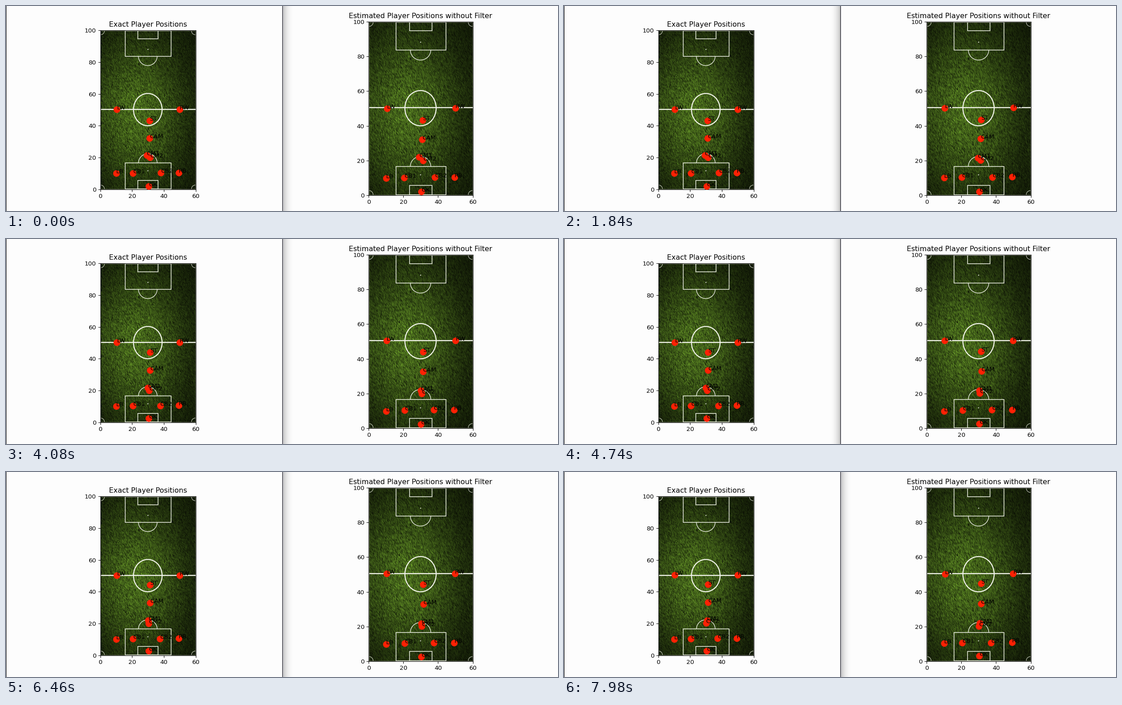
Recreate the animation shown at these times as a matplotlib script. Size 1227x456 px, loop 8 s.

```python
import numpy as np
import matplotlib.pyplot as plt
from matplotlib.animation import FuncAnimation
from matplotlib.patches import Arc, Ellipse, Rectangle

W, H, DPI = 1227, 456, 96
STEP_MS, LOOP_MS = 100, 8000
UPDATES, PERIOD_MS = 4, 1950
CHALK = "#e4e8da"

plt.rcParams["font.family"] = "DejaVu Sans"

# Starting line-up in pitch coordinates
FORMATION = {
    "LW": (10.4, 50.3), "RW": (49.9, 50.3), "ST": (31.1, 43.3),
    "CAM": (31.1, 32.1), "CM1": (29.2, 21.5), "CM2": (31.4, 20),
    "LB": (10.1, 10), "CB1": (20.6, 10.2), "CB2": (38.1, 10.4),
    "RB": (49.3, 10.5), "GK": (30.4, 2),
}
# Total drift over the loop: attackers go up, the midfielders swap sides
DRIFT = {"ST": (0.3, 1.4), "CAM": (0.3, 1.3), "CM1": (1.4, 0.5),
         "CM2": (-1.4, 0.2), "CB2": (-0.9, 0.2), "GK": (0, 0.9)}
STAY = (0, 0.2)


def grass(rows=386, cols=232):
    rng = np.random.default_rng(5)
    y, x = np.mgrid[1:0:rows * 1j, 0:1:cols * 1j]
    light = 0.22 + 0.92 * np.exp(-((x - 0.38) / 0.5) ** 2 - ((y - 0.48) / 0.47) ** 2)
    grain = rng.normal(size=(rows, cols))
    blades = sum(np.roll(grain, (k, k // 2), (0, 1)) for k in range(4)) / 2
    light = light * (1 + 0.26 * blades)
    return np.clip(light[..., None] * np.array([62, 91, 24]) / 255, 0, 1)


def draw_pitch(ax):
    def box(x0, y0, x1, y1, lw=1.2, **kw):
        ax.add_patch(Rectangle((x0, y0), x1 - x0, y1 - y0, fill=False,
                               ec=CHALK, lw=lw, **kw))

    ax.imshow(TURF, extent=(0, 60, 0, 100), aspect="auto", interpolation="nearest")
    box(0.2, 0.3, 59.8, 99.7, lw=0.7, alpha=0.5)
    ax.plot([0.2, 59.8], [50.4, 50.4], color="#f2f4ea", lw=1.8)
    ax.add_patch(Ellipse((29.9, 50.2), 18, 20.3, fill=False, ec="#f2f4ea", lw=1.7))
    for goal, area, edge in ((99.7, 94.7, 83.8), (0.3, 5.7, 16.5)):
        box(15.7, edge, 44.6, goal)
        box(23.5, area, 36.4, goal)
        start = 180 if goal > 50 else 0
        ax.add_patch(Arc((29.9, edge), 11.8, 11.8, theta1=start,
                         theta2=start + 180, ec=CHALK, lw=1.1))
    corners = [(0.2, 0.3), (59.8, 0.3), (59.8, 99.7), (0.2, 99.7)]
    for k, corner in enumerate(corners):
        ax.add_patch(Arc(corner, 4.8, 4.8, theta1=90 * k, theta2=90 * k + 90,
                         ec=CHALK, lw=0.9, alpha=0.8))
    ax.plot([29.9, 29.9], [88.3, 11.9], "o", color=CHALK, ms=1.8, mew=0)


class Plot:
    """A pitch whose players move on at regular updates, with optional jitter."""

    def __init__(self, title, left, top, height, first_ms, jitter=0):
        ax = fig.add_axes([left / W, 1 - (top + height) / H,
                           0.6 * height / W, height / H])
        draw_pitch(ax)
        ax.set(xlim=(0, 60), ylim=(0, 100), xticks=range(0, 61, 20),
               yticks=range(0, 101, 20))
        ax.set_title(title, fontsize=11.9)
        self.first_ms = first_ms
        start = np.array(list(FORMATION.values()), float)
        drift = np.array([DRIFT.get(role, STAY) for role in FORMATION])
        steps = np.linspace(0, 1, UPDATES + 1)[:, None, None]
        noise = np.random.default_rng(3).normal(0, 1, (UPDATES + 1, *start.shape))
        self.track = start + drift * steps + jitter * noise
        self.dots, = ax.plot([], [], "o", color="#ff2104", ms=10, zorder=4)
        self.labels = [ax.text(0, 0, role, zorder=5) for role in FORMATION]

    def show(self, ms):
        """Place the players and return the time of the latest update."""
        n = max(0, (ms - self.first_ms) // PERIOD_MS + 1)
        spots = self.track[min(n, UPDATES)]
        self.dots.set_data(*spots.T)
        for label, spot in zip(self.labels, spots):
            label.set_position(spot)
        return self.first_ms + (n - 1) * PERIOD_MS if n else 0


def shadow(x0, x1, alpha):
    strip = np.full((1, len(alpha), 4), 0.58)
    strip[..., 3] = alpha
    return desk.imshow(strip, extent=(x0, x1, H, 0), aspect="auto",
                       interpolation="nearest")


fig = plt.figure(figsize=(W / DPI, H / DPI), dpi=DPI, facecolor="#fdfdfd")
desk = fig.add_axes([0, 0, 1, 1])
desk.axis("off")

fade = 0.5 * np.linspace(1, 0, 25) ** 2.2
shade_right = shadow(616, 641, fade)
shade_left = shadow(589, 614, fade[::-1])
for x, tone in ((0, "#000000"), (614, "#26262c"), (615, "#9c9ca8")):
    desk.add_patch(Rectangle((x, 0), 1, H, fc=tone, lw=0))
desk.set(xlim=(0, W), ylim=(H, 0))

TURF = grass()
exact = Plot("Exact Player Positions", 209.5, 54.4, 353.4, first_ms=1900)
guess = Plot("Estimated Player Positions without Filter", 806, 35, 386,
             first_ms=700, jitter=0.12)


def draw(i):
    ms = i * STEP_MS
    # The window updated last has the focus and casts its shadow on the other
    left_focus = exact.show(ms) >= guess.show(ms)
    shade_right.set_visible(left_focus)
    shade_left.set_visible(not left_focus)
    return []


anim = FuncAnimation(fig, draw, frames=LOOP_MS // STEP_MS, interval=STEP_MS,
                     repeat=True, repeat_delay=0)
plt.show()
```
